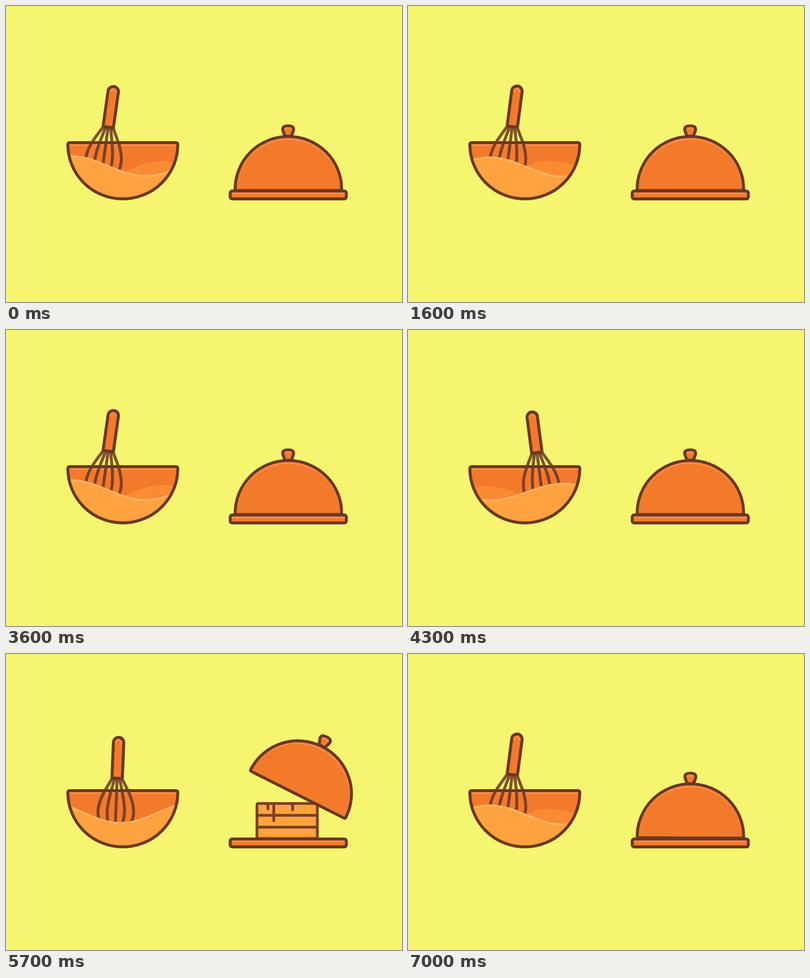
Animation of 800 by 600 pixels, one loop 7100 ms. Source, as an HTML page:

```html
<!DOCTYPE html>
<html lang="en">
<head>
<meta charset="utf-8">
<title>Kitchen icons</title>
<style>
  html, body { margin: 0; width: 100%; height: 100%; overflow: hidden; background: #f6f56f; }
  svg { display: block; width: 100%; height: 100%; }
  .line { fill: none; stroke: #6b3822; stroke-width: 6; stroke-linecap: round; stroke-linejoin: round; }
  .shine { fill: none; stroke: #fb8b45; stroke-width: 4; stroke-linecap: round; }
  .thin { stroke: #7a3f24; stroke-width: 5.5; }
  .base { fill: #f47a2b; }
</style>
</head>
<body>
<svg viewBox="0 0 800 600">
  <defs>
    <path id="bowl" d="M129 277H343Q347 277 347 281A111 110 0 0 1 125 281Q125 277 129 277Z"/>
    <path id="dome" d="M466 374Q463 374 463 371A107.5 106.5 0 0 1 678 371Q678 374 675 374Z"/>
    <path id="grip" d="M-10.5-72.5A10.5 10.5 0 0 1 10.5-72.5V-3Q10.5 0 7.5 0H-7.5Q-10.5 0-10.5-3Z"/>
    <clipPath id="inBowl"><use href="#bowl"/></clipPath>
  </defs>

  <g clip-path="url(#inBowl)">
    <use href="#bowl" class="base"/>
    <path d="M126 282H346" class="shine"/>
    <path id="backShine" fill="#fa9140"/>
    <path id="back" fill="#f98b33"/>
  </g>
  <g id="wires" opacity=".86"></g>
  <g clip-path="url(#inBowl)">
    <path id="frontShine" fill="#ffb060"/>
    <path id="front" fill="#ffa23f"/>
  </g>
  <g id="handle">
    <use href="#grip" class="base"/>
    <path class="shine" d="M-6-72A6 6 0 0 1 6-72"/>
    <use href="#grip" class="line"/>
  </g>
  <use href="#bowl" class="line"/>

  <g class="line thin">
    <path fill="#ffa23f" d="M510 303H626Q629 303 629 306V370Q629 374 625 374H511Q507 374 507 370V306Q507 303 510 303Z"/>
    <path d="M507 327H629M507 351H629"/>
    <path id="drips"/>
  </g>
  <g id="lid">
    <path class="line" style="fill:#f47a2b" d="M563.5 264C562 258 559 254 559 250Q559 243 570 243Q581 243 581 250C581 254 578 258 576.5 264Z"/>
    <path class="shine" d="M564.5 248.5Q570 246.5 575.5 248.5"/>
    <use href="#dome" fill="#fb8b45"/>
    <path class="base" d="M466 374A104.5 102.5 0 0 1 675 374Z"/>
    <use href="#dome" class="line"/>
  </g>
  <rect class="base" x="453" y="375" width="234.5" height="16" rx="4"/>
  <path class="shine" d="M458 380H683"/>
  <rect class="line" x="453" y="375" width="234.5" height="16" rx="4"/>
</svg>
<script>
const LOOP = 7100, STEP = 100, STIR = 1800, WAVE = 300;
const KEYS = [0, 300, 800, 1300, 1600];
const TAU = Math.PI * 2;
const el = id => document.getElementById(id);

// Smooth cyclic curve through one value per key time
function track(vals) {
  const n = KEYS.length;
  const key = i => KEYS[(i + n) % n] + Math.floor(i / n) * STIR;
  const val = i => vals[(i + n) % n];
  const rate = i => (val(i + 1) - val(i)) / (key(i + 1) - key(i));
  const slope = i => {
    const a = key(i) - key(i - 1), b = key(i + 1) - key(i);
    return (rate(i - 1) * b + rate(i) * a) / (a + b);
  };
  return p => {
    let i = n - 1;
    while (key(i) > p) i--;
    const h = key(i + 1) - key(i), u = (p - key(i)) / h, v = 1 - u;
    return val(i) * v * v * (1 + 2 * u) + slope(i) * h * u * v * v
      + val(i + 1) * u * u * (3 - 2 * u) - slope(i + 1) * h * u * u * v;
  };
}

const lift = track([245.5, 252, 247.3, 244, 244.6]);
const frontMid = track([322.5, 319.5, 328, 328.5, 324.5]);
const frontAmp = track([20, 21, 16.5, 20.5, 19.5]);
const backMid = track([335, 338, 337, 343, 335]);

const swing = (p, zero) => Math.sin(TAU * (p - zero) / STIR);

function ease(t, start, span) {
  const u = Math.min(1, Math.max(0, (t - start) / span));
  return u < .5 ? 4 * u ** 3 : 1 - 4 * (1 - u) ** 3;
}

function liquid(crest, mid, amp) {
  let d = "M110 400";
  for (let x = 110; x <= 362; x += 4) {
    d += `L${x} ${(mid - amp * Math.cos(TAU * (x - crest) / WAVE)).toFixed(2)}`;
  }
  return d + "V400Z";
}

function pour(id, crest, mid, amp, shine) {
  el(id + "Shine").setAttribute("d", liquid(crest, mid, amp));
  el(id).setAttribute("d", liquid(crest, mid + shine, amp));
}

// Wires mirror around a straight middle one
const outer = s => `M${10 * s} 0C${18 * s} 17 ${36 * s} 42 ${36 * s} 69C${36 * s} 82 ${32 * s} 92 ${22 * s} 102`;
const inner = s => `M${5 * s} 0C${9 * s} 20 ${17.5 * s} 45 ${17.5 * s} 68C${17.5 * s} 82 ${14 * s} 94 ${9 * s} 102`;
el("wires").innerHTML =
  `<path class="line" d="${outer(-1)}${inner(-1)}M0 0V102${inner(1)}${outer(1)}"/>`;

const drip = (x, len) => `M${x} 303v${len}`;

function draw(t) {
  const p = t % STIR;
  const x = 235.5 - 29.3 * swing(p, 1310);
  const pose = `translate(${x} ${lift(p)}) rotate(${8.3 * swing(p, 1280)})`;
  el("wires").setAttribute("transform", pose);
  el("handle").setAttribute("transform", pose);

  const drift = WAVE * p / STIR;
  pour("front", 131.7 - drift, frontMid(p), frontAmp(p), 4);
  pour("back", 318 + drift + 13.5 * (1 - Math.cos(TAU * p / STIR)), backMid(p), 20, 2);

  // The lid rises first, then swings aside
  const open = Math.max(0, ease(t, 4480, 800) - ease(t, 6300, 800));
  el("lid").setAttribute("transform",
    `translate(${18.7 * open ** 3} ${-88.7 * open ** .9}) rotate(${26.8 * open} 570.5 374)`);
  el("drips").setAttribute("d", drip(529, 11 * open) + drip(541, 35 * open) + drip(579, 13 * open));
}

const begin = performance.now();
function tick() {
  const t = (performance.now() - begin) % LOOP;
  draw(Math.floor(t / STEP) * STEP);
  requestAnimationFrame(tick);
}
tick();
</script>
</body>
</html>
```
